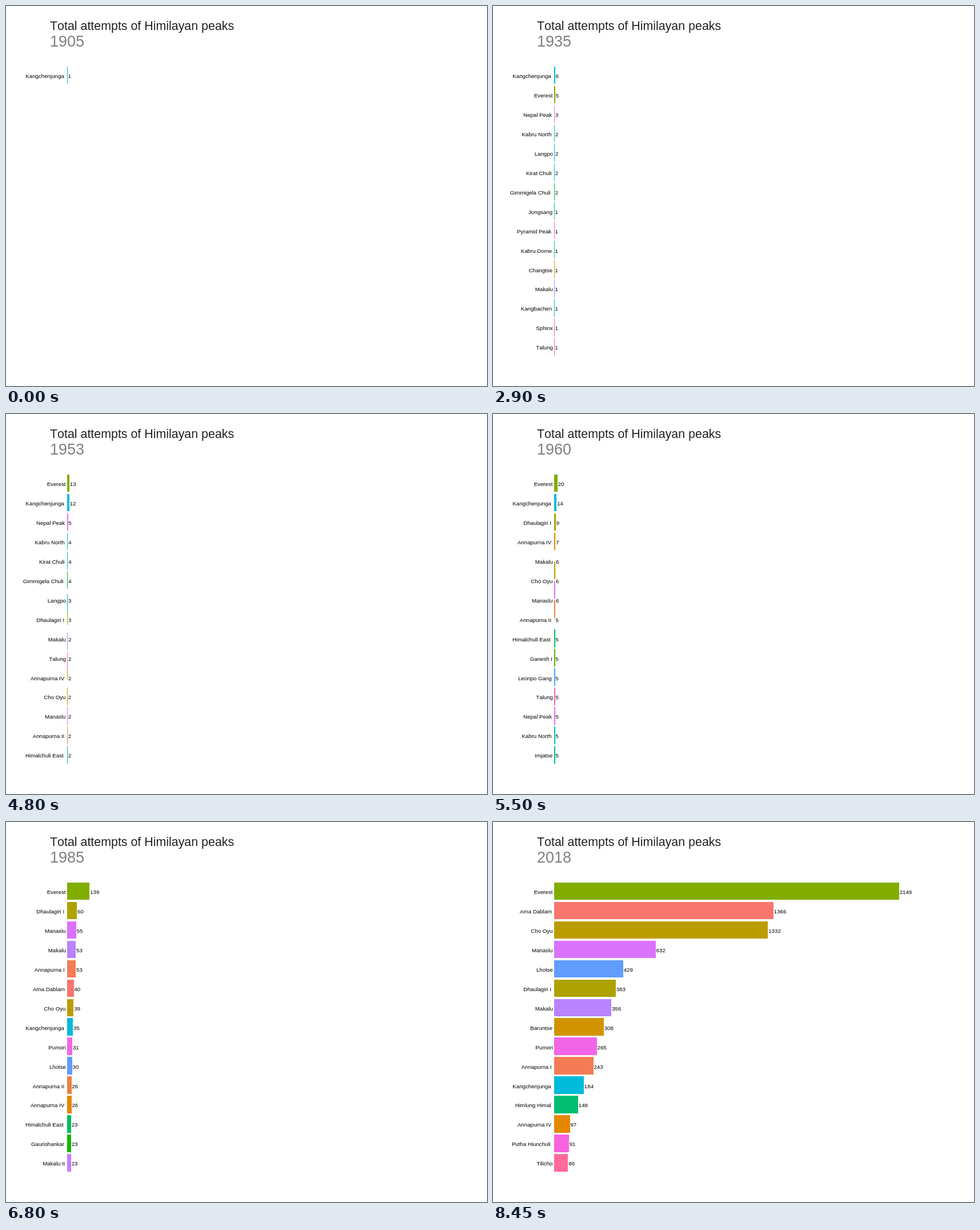
Recreate the animation shown at these times as an HTML page. Size 842x665 px, loop 10000 ms.

```html
<!DOCTYPE html>
<html lang="en">
<head>
<meta charset="utf-8">
<title>Total attempts of Himilayan peaks</title>
<style>
  html, body { margin: 0; width: 100%; height: 100%; overflow: hidden; background: #fff; }
  svg { display: block; width: 842px; height: 665px; font: 9.7px "Liberation Sans", Arial, sans-serif; font-kerning: none; }
  rect { shape-rendering: crispEdges; }
  .title { font-size: 21.4px; fill: #222; }
  .year { font-size: 27px; fill: #7f7f7f; }
  .name { text-anchor: end; }
</style>
</head>
<body>
<svg viewBox="0 0 842 665">
  <text class="title" x="77" y="42">Total attempts of Himilayan peaks</text>
  <text class="year" x="77" y="71"></text>
</svg>
<script>
const COLORS = {
  'Ama Dablam': '#f8766d', 'Annapurna I': '#f37c55', 'Annapurna II': '#ee8042',
  'Annapurna IV': '#e58700', 'Baruntse': '#d29300', 'Changtse': '#c49a00',
  'Cho Oyu': '#bb9d00', 'Dhaulagiri I': '#ada200', 'Everest': '#81ad00',
  'Ganesh I': '#5bb300', 'Gaurishankar': '#13b700', 'Gimmigela Chuli': '#00ba38',
  'Himalchuli East': '#00bd5c', 'Himlung Himal': '#00bf70', 'Imjatse': '#00c085',
  'Jannu': '#00c094', 'Jongsang': '#00c0a2', 'Kabru Dome': '#00c0ac',
  'Kabru North': '#00bfb4', 'Kangbachen': '#00bcd4', 'Kangchenjunga': '#00bbda',
  'Kirat Chuli': '#00b4ef', 'Langpo': '#00acfc', 'Leonpo Gang': '#45a2ff',
  'Lhotse': '#619cff', 'Makalu': '#b983ff', 'Makalu II': '#c77cff',
  'Manaslu': '#db72fb', 'Nepal Peak': '#e76bf3', 'Pumori': '#f265e7',
  'Putha Hiunchuli': '#f962dd', 'Pyramid Peak': '#fd61d1', 'Sphinx': '#ff62bc',
  'Talung': '#ff64b0', 'Tilicho': '#ff6a98'
};

// Running totals by year; ties rank in the order listed.
const TOTALS = {
  1905: 'Kangchenjunga 1',
  1907: 'Kabru North 1',
  1909: 'Langpo 1',
  1911: 'Kirat Chuli 1',
  1914: 'Talung 1',
  1923: 'Kangchenjunga 3,Everest 3,Kabru North 2,Langpo 2,Kirat Chuli 1,Talung 1,Jongsang 1',
  1930: 'Nepal Peak 2,Pyramid Peak 1,Kangbachen 1,Sphinx 1',
  1934: 'Changtse 1,Makalu 1',
  1945: 'Kangchenjunga 10,Everest 8,Nepal Peak 5,Kirat Chuli 4,Gimmigela Chuli 4,Kabru North 3,Langpo 3,' +
    'Changtse 2,Pyramid Peak 2,Kabru Dome 2,Jongsang 2,Makalu 1,Talung 1,Kangbachen 1,Sphinx 1',
  1959: 'Annapurna IV 7,Cho Oyu 6,Manaslu 6,Annapurna II 5,Makalu 5,Himalchuli East 5,Ganesh I 5,' +
    'Leonpo Gang 5,Talung 5,Nepal Peak 5,Kabru North 5,Imjatse 5',
  1960: 'Everest 20,Kangchenjunga 14,Dhaulagiri I 9,Annapurna IV 7,Makalu 6,Cho Oyu 6,Manaslu 6,' +
    'Annapurna II 5,Himalchuli East 5,Ganesh I 5,Leonpo Gang 5,Talung 5,Nepal Peak 5,Kabru North 5,Imjatse 5',
  1976: 'Everest 57',
  1985: 'Everest 139,Dhaulagiri I 60,Manaslu 55,Makalu 53,Annapurna I 53,Ama Dablam 40,Cho Oyu 39,' +
    'Kangchenjunga 35,Pumori 31,Lhotse 30,Annapurna II 26,Annapurna IV 26,Himalchuli East 23,Gaurishankar 23,Makalu II 23',
  1997: 'Everest 490',
  2002: 'Everest 774,Cho Oyu 564,Ama Dablam 402,Dhaulagiri I 212,Pumori 181,Makalu 167,Manaslu 165,' +
    'Annapurna I 136,Baruntse 133,Lhotse 128,Kangchenjunga 101,Annapurna IV 69,Tilicho 52,Jannu 45,Makalu II 41',
  2018: 'Everest 2149,Ama Dablam 1366,Cho Oyu 1332,Manaslu 632,Lhotse 429,Dhaulagiri I 383,Makalu 356,' +
    'Baruntse 308,Pumori 265,Annapurna I 243,Kangchenjunga 184,Himlung Himal 148,Annapurna IV 97,Putha Hiunchuli 91,Tilicho 86'
};

// [frame, year] pairs: the pace doubles after 1960.
const PACE = [[0, 1905], [36, 1923], [78, 1945], [110, 1959.5], [111, 1960], [169, 2018]];
const ROWS = 15, PITCH = 33.95, SCALE = 0.2808, FRAME_MS = 50, LOOP_MS = 10000;
const names = Object.keys(COLORS);
const series = Object.fromEntries(names.map(n => [n, []]));

// A peak new to the list grows from a little below the last full ranking.
let base;
for (const [year, text] of Object.entries(TOTALS)) {
  const list = text.split(',').map((item, i) => {
    const cut = item.lastIndexOf(' ');
    return [item.slice(0, cut), item.slice(cut + 1) - i * 0.002];
  });
  for (const [name, v] of list) {
    const points = series[name];
    if (!points.length && base) points.push(base);
    points.push([+year, v]);
  }
  if (text.includes('Kangchenjunga')) base = [+year, list[list.length - 1][1] * 0.6];
}

function lerp(points, x, curve = v => v, inverse = v => v) {
  if (x < points[0][0]) return 0;
  const i = points.findIndex(p => p[0] > x);
  if (i < 0) return points[points.length - 1][1];
  const [x0, a] = points[i - 1], [x1, b] = points[i];
  const t = (x - x0) / (x1 - x0);
  return t ? inverse(curve(a) + (curve(b) - curve(a)) * t) : a;
}

function ranking(year) {
  return names
    .map(name => ({ name, v: lerp(series[name], year, Math.log, Math.exp) }))
    .filter(d => d.v > 0.95)
    .sort((a, b) => b.v - a.v)
    .slice(0, ROWS)
    .map((d, rank) => ({ ...d, rank }));
}

const svg = document.querySelector('svg');
const yearText = document.querySelector('.year');

function add(tag, attrs) {
  const el = document.createElementNS('http://www.w3.org/2000/svg', tag);
  for (const k in attrs) el.setAttribute(k, attrs[k]);
  return svg.appendChild(el);
}

const bars = names.map(n => add('rect', { x: 107, height: 30.5, fill: COLORS[n] }));
const rows = Array.from({ length: ROWS }, (_, i) => {
  const y = 126 + i * PITCH;
  return { name: add('text', { class: 'name', y }), value: add('text', { y }) };
});

function draw(frame) {
  const time = lerp(PACE, frame);
  const year = Math.floor(time + 0.5), from = Math.floor(time), part = time - from;
  const now = ranking(year), before = ranking(from), after = ranking(from + 1);
  const mix = (a, b) => a + (b - a) * part;

  yearText.textContent = year;
  names.forEach((name, i) => {
    const find = list => list.find(d => d.name === name);
    const d = find(now);
    bars[i].style.display = d ? '' : 'none';
    if (!d) return;
    const a = find(before) || d, b = find(after) || d;
    bars[i].setAttribute('y', 105.8 + PITCH * mix(a.rank, b.rank));
    bars[i].setAttribute('width', Math.max(1, mix(a.v, b.v) * SCALE + 0.3));
  });
  rows.forEach(({ name, value }, i) => {
    const d = now[i];
    name.textContent = d ? d.name : '';
    value.textContent = d ? Math.round(d.v) : '';
    if (!d) return;
    name.setAttribute('x', 107.8 - 0.47 * d.name.length);
    value.setAttribute('x', 108.2 + d.v * SCALE);
  });
}

function tick() {
  draw(Math.min(169, Math.floor(performance.now() % LOOP_MS / FRAME_MS)));
  requestAnimationFrame(tick);
}
tick();
</script>
</body>
</html>
```
